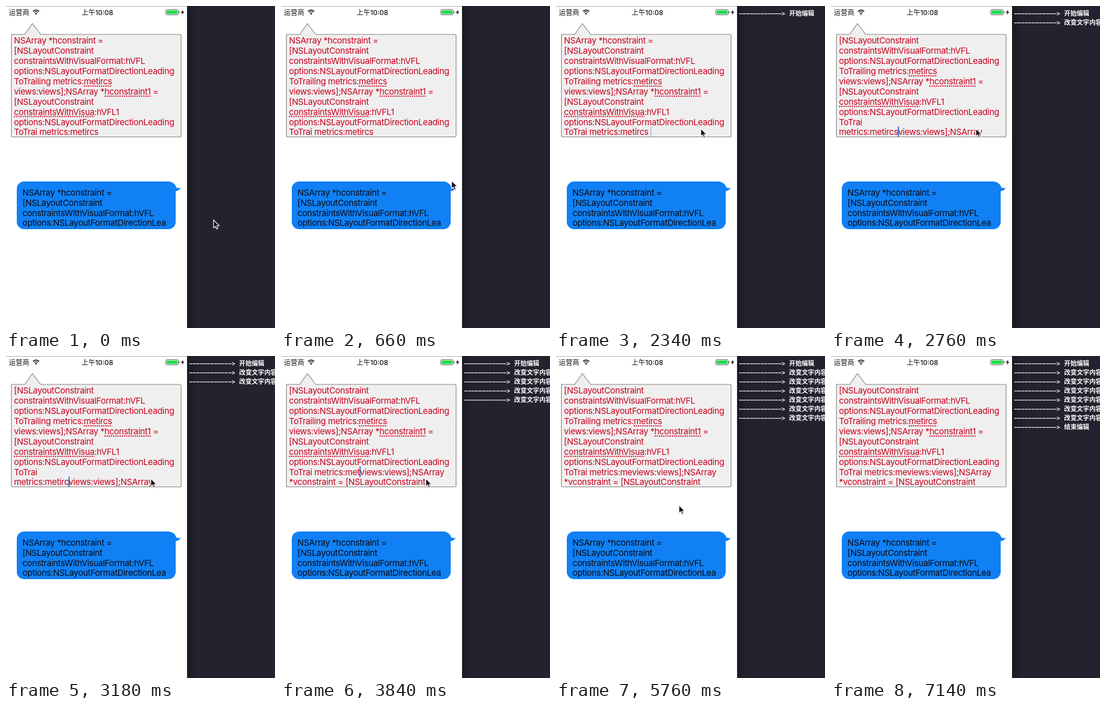
Recreate the animation shown at these times as an HTML page with a canvas. Size 474 by 567 pixels, loop 7200 ms.

```html
<!DOCTYPE html>
<html lang="zh">
<head>
<meta charset="utf-8">
<style>
  html, body { margin: 0; width: 474px; height: 567px; overflow: hidden; }
  canvas { display: block; }
</style>
</head>
<body>
<canvas id="stage" width="474" height="567"></canvas>
<script>
const ctx = document.getElementById('stage').getContext('2d');
const LOOP = 7200, STEP = 60, LINE = 17.9;
const CJK = '"Noto Sans CJK SC", "Noto Sans CJK", sans-serif';
const BODY = '15px Inter, sans-serif';

const rows = [
  'NSArray *hconstraint =',
  '[NSLayoutConstraint',
  'constraintsWithVisualFormat:hVFL',
  'options:NSLayoutFormatDirectionLeading',
  'ToTrailing metrics:metircs',
  'views:views];NSArray *hconstraint1 =',
  '[NSLayoutConstraint',
  'constraintsWithVisua:hVFL1',
  'options:NSLayoutFormatDirectionLeading'
];
const misspelt = [
  [4, 'ToTrailing metrics:', 'metircs'],
  [5, 'views:views];NSArray *', 'hconstraint1'],
  [7, '', 'constraintsWithVisua']
];

// Editing timeline, in ms
const focusAt = 1480, blurAt = 6000, logDelay = 90;
const deletions = [2580, 2900, 3360, 3600, 3800, 4150];
const log = [
  [focusAt, '开始编辑'],
  ...deletions.map(at => [at + logDelay, '改变文字内容']),
  [blurAt, '结束编辑']
];
const pointerPath = [
  [0, 365, 376], [200, 365, 376], [1200, 217, 219], [1620, 217, 219],
  [2200, 254.5, 215], [4900, 254.5, 215], [5560, 216, 262],
  [6300, 216, 262], [6900, 232, 575], [LOOP, 232, 575]
];

function text(str, x, y, font, color, spacing = 0) {
  ctx.font = font;
  ctx.letterSpacing = spacing + 'px';
  ctx.fillStyle = color;
  ctx.fillText(str, x, y);
}

const bodyText = (str, x, y, color) => text(str, x, y, BODY, color, -0.34);

function widthOf(str) {
  ctx.font = BODY;
  ctx.letterSpacing = '-0.34px';
  return ctx.measureText(str).width;
}

function polygon(points) {
  ctx.beginPath();
  points.forEach(([x, y]) => ctx.lineTo(x, y));
  ctx.closePath();
}

function clipped(x, y, w, h, draw) {
  ctx.save();
  ctx.beginPath();
  ctx.rect(x, y, w, h);
  ctx.clip();
  draw();
  ctx.restore();
}

function background() {
  ctx.fillStyle = '#fff';
  ctx.fillRect(0, 0, 319, 567);
  ctx.fillStyle = '#b3aab0';
  ctx.fillRect(0, 0, 319, 1);
  const shade = ctx.createLinearGradient(319, 0, 337, 0);
  shade.addColorStop(0, '#1a1a24');
  shade.addColorStop(1, '#22232e');
  ctx.fillStyle = shade;
  ctx.fillRect(319, 0, 155, 567);
}

function statusBar() {
  text('运营商', 5, 15.5, '12px ' + CJK, '#111');
  ctx.textAlign = 'center';
  text('上午10:08', 161, 15.5, '500 12px Inter, ' + CJK, '#111');
  ctx.textAlign = 'left';

  ctx.strokeStyle = '#111';
  ctx.lineWidth = 1.7;
  for (const r of [7.7, 4.8]) {
    ctx.beginPath();
    ctx.arc(53, 14.8, r, -Math.PI * 0.75, -Math.PI * 0.25);
    ctx.stroke();
  }
  ctx.fillStyle = '#111';
  ctx.beginPath();
  ctx.moveTo(53, 15.8);
  ctx.arc(53, 15, 2.6, -Math.PI * 0.75, -Math.PI * 0.25);
  ctx.fill();

  ctx.lineWidth = 1;
  ctx.strokeStyle = '#555';
  ctx.beginPath();
  ctx.roundRect(281.5, 6.5, 22, 9, 2);
  ctx.stroke();
  ctx.fillStyle = '#1fdc4c';
  ctx.fillRect(283, 8, 19, 6);
  ctx.fillStyle = '#555';
  ctx.fillRect(304.5, 9.5, 1.3, 3);
  ctx.fillStyle = '#111';
  polygon([[312.5, 6.5], [308, 11.7], [310.8, 11.7], [309.6, 15.8], [314.2, 10.3], [311.4, 10.3]]);
  ctx.fill();
}

// Visible rows and caret place after a number of deletions
function layout(count) {
  const word = 'metircs '.slice(0, 8 - count);
  const tail = 'views:views];NSArray';
  const rest = rows.slice(1);
  if (!count) {
    const last = 'ToTrai metrics:' + word;
    return { lines: [...rows, last], scroll: 0, caretRow: 9, before: last };
  }
  if (count < 3) {
    const before = 'metrics:' + word;
    return { lines: [...rest, 'ToTrai', before + tail], scroll: 1, caretRow: 9, before };
  }
  const before = 'ToTrai metrics:' + word;
  return {
    lines: [...rest, before + tail, '*vconstraint = [NSLayoutConstraint'],
    scroll: 1, caretRow: 8, before
  };
}

function caretAlpha(t) {
  if (t < focusAt || t >= blurAt) return 0;
  const last = Math.max(focusAt, ...deletions.filter(at => at <= t));
  const phase = (t - last) % 1000;
  if (phase < 500) return 1;
  return Math.max(0, 1 - (phase - 500) / 100, (phase - 800) / 200);
}

function editor(t) {
  polygon([[9.5, 50], [33, 50], [46.5, 31], [61, 50], [307, 50], [308.5, 51.5],
    [308.5, 229], [307, 230.5], [11, 230.5], [9.5, 229]]);
  ctx.fillStyle = '#f0eff0';
  ctx.fill();
  ctx.strokeStyle = '#808080';
  ctx.lineWidth = 1.1;
  ctx.stroke();

  const { lines, scroll, caretRow, before } =
    layout(deletions.filter(at => at <= t).length);
  const baseline = row => 66.3 + row * LINE;
  clipped(10, 51, 298, 179, () => {
    lines.forEach((line, i) => bodyText(line, 14, baseline(i), '#c7001c'));
    ctx.strokeStyle = '#d3122b';
    ctx.lineWidth = 2;
    ctx.setLineDash([2.2, 1.6]);
    for (const [row, prefix, word] of misspelt) {
      const x = 14 + widthOf(prefix), y = baseline(row - scroll) + 3;
      ctx.beginPath();
      ctx.moveTo(x, y);
      ctx.lineTo(x + widthOf(word), y);
      ctx.stroke();
    }
    ctx.setLineDash([]);
    ctx.globalAlpha = caretAlpha(t);
    ctx.fillStyle = '#2c66c4';
    ctx.fillRect(13.5 + widthOf(before), baseline(caretRow) - 15, 2, 18.5);
    ctx.globalAlpha = 1;
  });
}

function blueBubble() {
  ctx.fillStyle = '#1080f4';
  ctx.beginPath();
  ctx.roundRect(19, 309, 280, 84, 13);
  ctx.fill();
  ctx.beginPath();
  ctx.moveTo(293, 311);
  ctx.quadraticCurveTo(299, 314, 300, 319.5);
  ctx.quadraticCurveTo(304, 321.5, 308, 320);
  ctx.quadraticCurveTo(305, 325.5, 299, 326);
  ctx.lineTo(293, 326);
  ctx.fill();
  const lines = [...rows.slice(0, 3), 'options:NSLayoutFormatDirectionLea'];
  clipped(19, 309, 280, 84, () =>
    lines.forEach((line, i) => bodyText(line, 29, 333.7 + i * LINE, '#0a0a14')));
}

function consoleLog(t) {
  log.filter(([at]) => at <= t).forEach(([, message], i) => {
    const y = 17 + i * 16;
    text('−'.repeat(12) + '>', 322.5, y, 'bold 10.4px "DejaVu Sans Mono", monospace', '#fff');
    text(message, 410.8, y, 'bold 11.1px ' + CJK, '#fff');
  });
}

function pointer(t) {
  const k = pointerPath.findIndex(key => key[0] > t);
  const [t0, x0, y0] = pointerPath[k - 1], [t1, x1, y1] = pointerPath[k];
  const u = (t - t0) / (t1 - t0), e = u * u * (3 - 2 * u);
  ctx.save();
  ctx.translate(x0 + (x1 - x0) * e + 0.7, y0 + (y1 - y0) * e + 0.8);
  polygon([[0, 0], [0, 14], [3.2, 11.2], [5.4, 16], [7.8, 15], [5.7, 10.2], [10, 10]]);
  ctx.fillStyle = '#0c0c1a';
  ctx.strokeStyle = '#fff';
  ctx.lineWidth = 1.2;
  ctx.shadowColor = 'rgba(0,0,0,.35)';
  ctx.shadowBlur = 2;
  ctx.shadowOffsetY = 1;
  ctx.fill();
  ctx.shadowColor = 'transparent';
  ctx.stroke();
  ctx.restore();
}

const start = performance.now();
function frame() {
  const t = Math.floor((performance.now() - start) % LOOP / STEP) * STEP;
  background();
  statusBar();
  editor(t);
  blueBubble();
  consoleLog(t);
  pointer(t);
  requestAnimationFrame(frame);
}
frame();
</script>
</body>
</html>
```
